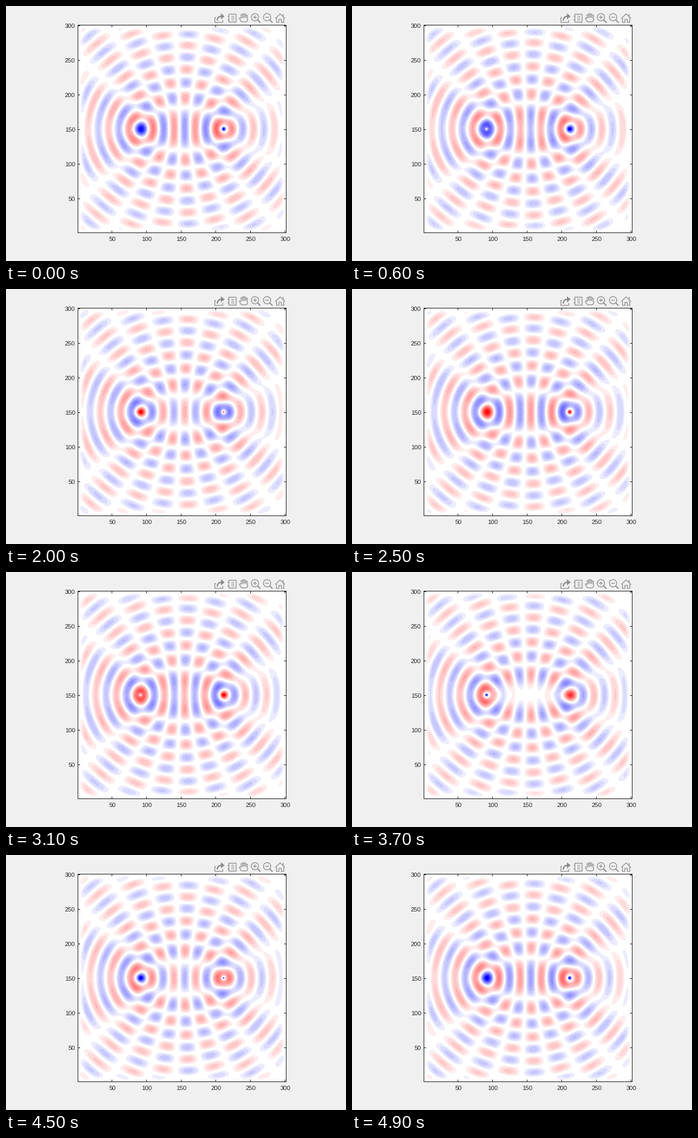
A matplotlib script for the animation above (5 s loop, 560 by 420 pixels).

```python
import numpy as np
import matplotlib.pyplot as plt
from matplotlib.animation import FuncAnimation
from matplotlib.patches import Circle, Polygon, Rectangle

W, H, DPI = 560, 420, 100
FRAMES, INTERVAL = 50, 100
PX = 72 / DPI                      # one pixel in points
BACK, INK, GRAY = "#f0f0f0", "#262626", "#8c8c8c"

LEFT, RIGHT, TOP, BOTTOM = 118.5, 461.5, 31.5, 373.5
CX, CY, SCALE = 290, 202.5, 1.14   # plot centre and pixels per unit
WAVENUMBER = 2 * np.pi / 30
HALF = 150                         # half the domain, in units
LAYER = 15                         # absorbing layer, in units
STEP, FULL = 0.08, 1.1             # contour step, value of full colour
BANDS = int(np.ceil(FULL / STEP))
SUB = 2                            # supersampling per pixel

plt.rcParams["font.family"] = "Liberation Sans"
plt.rcParams["text.hinting"] = "none"


def hankel(x):
    """Outgoing Hankel function of order zero, by its Laplace integral."""
    v = np.linspace(0, 5, 400)
    weight = np.exp(-v**2) * (v[1] - v[0]) * 2 / np.sqrt(np.pi)
    weight[0] /= 2
    envelope = (1 / np.sqrt(1 + 0.5j * v**2 / x[:, None])) @ weight
    return np.sqrt(2 / (np.pi * x)) * np.exp(1j * (x - np.pi / 4)) * envelope


def absorption(offset):
    depth = np.clip((np.abs(offset) - HALF + LAYER) / LAYER, 0, 1)
    return 3 * depth**3


def make_field():
    xs = np.arange(LEFT + 0.5, RIGHT - 0.5, 1 / SUB) + 0.5 / SUB
    ys = np.arange(TOP + 0.5, BOTTOM - 0.5, 1 / SUB) + 0.5 / SUB
    x, y = np.meshgrid((xs - CX) / SCALE, (ys - CY) / SCALE)
    radii = np.geomspace(0.19, 300, 3000)
    profile = hankel(WAVENUMBER * radii)
    total = 0
    for x0, phase in ((-60, 1), (60, 1j)):
        r = np.maximum(np.hypot(x - x0, y), 0.2)
        wave = np.interp(r, radii, profile.real) + 1j * np.interp(r, radii, profile.imag)
        loss = (absorption(x) * np.abs(x - x0) + absorption(y) * np.abs(y)) / r
        total = total - phase * wave * np.exp(-loss)
    return total


def make_palette():
    n = np.arange(-BANDS, BANDS + 1)
    fade = 255 * (1 - np.minimum(1, np.abs(n) * STEP / FULL))
    red = np.where(n < 0, fade, 255)
    blue = np.where(n > 0, fade, 255)
    return np.stack([red, fade, blue], axis=1).astype(np.float32)


field = make_field()
field_re, field_im = field.real.copy(), field.imag.copy()
palette = make_palette()


def picture(i):
    a = 2 * np.pi * i / FRAMES
    u = field_re * np.cos(a) + field_im * np.sin(a)
    band = np.clip(np.trunc(u / STEP), -BANDS, BANDS).astype(int) + BANDS
    rgb = palette[band]
    small = sum(rgb[j::SUB, k::SUB] for j in range(SUB) for k in range(SUB))
    return np.rint(small / SUB**2).astype(np.uint8)


fig = plt.figure(figsize=(W / DPI, H / DPI), dpi=DPI, facecolor=BACK)
ax = fig.add_axes([0, 0, 1, 1])
ax.axis("off")

image = ax.imshow(picture(0), extent=(LEFT + 0.5, RIGHT - 0.5, BOTTOM - 0.5, TOP + 0.5),
                  interpolation="nearest", aspect="auto")
ax.set_xlim(0, W)
ax.set_ylim(H, 0)


def line(x, y, color=GRAY, width=1.2, cap="butt"):
    ax.plot(x, y, color=color, lw=width * PX, snap=False,
            solid_capstyle=cap, solid_joinstyle="miter")


def box(x, y, w, h, color=GRAY, width=1.2):
    ax.add_patch(Rectangle((x, y), w, h, fill=False, ec=color, lw=width * PX, snap=False))


def draw_axes():
    box(LEFT, TOP, RIGHT - LEFT, BOTTOM - TOP, INK, 1)
    label = dict(fontsize=10.3 * PX, color=INK, va="baseline")
    for value in range(50, 301, 50):
        offset = (value - 151) * SCALE
        x, y = np.floor(CX + offset) + 0.5, np.floor(CY - offset) + 0.5
        for sign in (1, -1):
            x_edge, y_edge = (LEFT, TOP) if sign > 0 else (RIGHT, BOTTOM)
            line([x, x], [y_edge, y_edge + 3.5 * sign], INK, 1)
            line([x_edge, x_edge + 3.5 * sign], [y, y], INK, 1)
        ax.text(x + 0.5, 388, str(value), ha="center", **label)
        ax.text(114, y + 4.5, str(value), ha="right", **label)


def draw_export(x, y):
    line([x - 5, x - 7, x - 7, x + 6, x + 6], [y - 1, y - 1, y + 7, y + 7, y + 3])
    a = np.linspace(0, np.pi / 2, 12)
    line(x + 3 - 6 * np.cos(a), y + 4 - 7 * np.sin(a), width=2.2)
    ax.add_patch(Polygon([(x + 3, y - 8), (x + 9, y - 3), (x + 3, y + 2)], color=GRAY, lw=0))


def draw_notes(x, y):
    box(x - 5, y - 6.5, 12, 13)
    for k in (-1, 0, 1):
        line([x - 1, x + 4], [y + 3 * k, y + 3 * k], width=1)
    for k in (-1, 1):
        line([x - 7, x - 4], [y + 3 * k, y + 3 * k])


def draw_hand(x, y):
    palm = [x - 2, x + 3], [y + 3, y + 3]
    line(*palm, width=8.5, cap="round")
    line([x - 6, x - 2], [y + 1, y + 5], width=3.4, cap="round")
    for k in range(4):
        top = y - 6 + 0.9 * (k - 1.3) ** 2
        finger = [x - 3.5 + 2.9 * k, x - 2 + 2 * k], [top, y + 2]
        line(*finger, width=3.4, cap="round")
        line(*finger, BACK, 1.2, "round")
    line([x - 6, x - 2], [y + 1, y + 5], BACK, 1.2, "round")
    line(*palm, BACK, 6, "round")


def draw_lens(x, y, plus):
    ax.add_patch(Circle((x, y), 6, fill=False, ec=GRAY, lw=1.2 * PX))
    line([x + 4.3, x + 9], [y + 4.3, y + 9], width=1.8)
    line([x - 3, x + 3], [y, y])
    if plus:
        line([x, x], [y - 3, y + 3])


def draw_home(x, y):
    line([x - 8, x, x + 8], [y + 0.5, y - 7, y + 0.5])
    side = np.array([6, 6, 2, 2])
    height = y + np.array([-0.5, 7, 7, 2])
    line(np.r_[x - side, x + side[::-1]], np.r_[height, height[::-1]])
    line([x + 5, x + 5], [y - 7, y - 3])


draw_axes()
draw_export(351, 20)
draw_notes(372, 20)
draw_hand(391.5, 19.5)
draw_lens(410, 18.5, True)
draw_lens(430, 18.5, False)
draw_home(451.5, 20)


def update(i):
    image.set_data(picture(i))
    return (image,)


anim = FuncAnimation(fig, update, frames=FRAMES, interval=INTERVAL, repeat=True)
plt.show()
```
